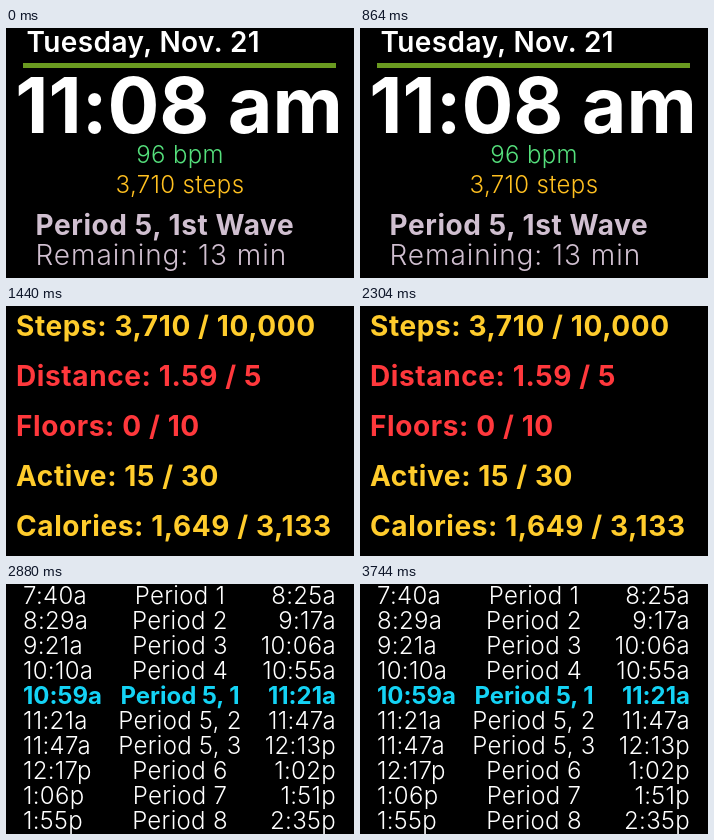
An HTML page for the animation above (4.32 s loop, 348 by 250 pixels).

```html
<!DOCTYPE html>
<html lang="en">
<head>
<meta charset="utf-8">
<title>Watch face</title>
<style>
html, body { margin: 0; height: 100%; overflow: hidden; background: #000; }
svg { display: block; }
/* keeps colons on the baseline between digits */
text { font-family: Inter, Roboto, sans-serif; font-feature-settings: "calt" 0; }
</style>
</head>
<body>
<svg id="stage" width="348" height="250"></svg>
<script>
const stage = document.getElementById('stage');
const SCREEN_MS = 1440;
const YELLOW = '#ffcc2c', RED = '#ff383c', THISTLE = '#d0bfd0', CYAN = '#14d3f5';

const TITLE = { size: 28, weight: 600, spacing: 0.4 };
const TIME = { size: 77, weight: 650, spacing: 0 };
const STAT = { size: 24, weight: 300, spacing: 0.35 };
const BOLD = { size: 28, weight: 700, spacing: 0.6 };
const LIGHT = { size: 28, weight: 300, spacing: 0.95 };
const ROW = { size: 24, weight: 300, spacing: 0.3 };
const ACTIVE_ROW = { size: 24, weight: 700, spacing: 0 };

const text = (str, x, y, { size, weight, spacing }, color, anchor = 'start') =>
  `<text x="${x}" y="${y}" font-size="${size}" font-weight="${weight}"
    letter-spacing="${spacing}" fill="${color}" text-anchor="${anchor}">${str}</text>`;

const clock = [
  text('Tuesday, Nov. 21', 20.5, 24, TITLE, '#fff'),
  '<rect x="17" y="35" width="313" height="5" fill="#6a9a20"/>',
  text('11:08 am', 173, 105, TIME, '#fff', 'middle'),
  text('96 bpm', 174, 135, STAT, '#55e07c', 'middle'),
  text('3,710 steps', 174, 165, STAT, '#ffc020', 'middle'),
  text('Period 5, 1st Wave', 29.5, 207, BOLD, THISTLE),
  text('Remaining: 13 min', 29.5, 237, LIGHT, THISTLE),
];

const activity = [
  ['Steps: 3,710 / 10,000', YELLOW],
  ['Distance: 1.59 / 5', RED],
  ['Floors: 0 / 10', RED],
  ['Active: 15 / 30', YELLOW],
  ['Calories: 1,649 / 3,133', YELLOW],
].map(([label, color], i) => text(label, 10, 30 + i * 50, BOLD, color));

const CURRENT = 4;
const schedule = [
  ['7:40a', '1', '8:25a'],
  ['8:29a', '2', '9:17a'],
  ['9:21a', '3', '10:06a'],
  ['10:10a', '4', '10:55a'],
  ['10:59a', '5, 1', '11:21a'],
  ['11:21a', '5, 2', '11:47a'],
  ['11:47a', '5, 3', '12:13p'],
  ['12:17p', '6', '1:02p'],
  ['1:06p', '7', '1:51p'],
  ['1:55p', '8', '2:35p'],
].flatMap(([start, name, end], i) => {
  const style = i === CURRENT ? [ACTIVE_ROW, CYAN] : [ROW, '#fff'];
  const y = 20 + i * 25;
  return [
    text(start, 17, y, ...style),
    text('Period ' + name, 174, y, ...style, 'middle'),
    text(end, 330, y, ...style, 'end'),
  ];
});

stage.innerHTML = [clock, activity, schedule].map(parts => `<g>${parts.join('')}</g>`).join('');
const screens = [...stage.children];

function draw() {
  const current = Math.floor(performance.now() / SCREEN_MS) % screens.length;
  screens.forEach((screen, i) => screen.setAttribute('display', i === current ? 'inline' : 'none'));
  requestAnimationFrame(draw);
}
draw();
</script>
</body>
</html>
```
